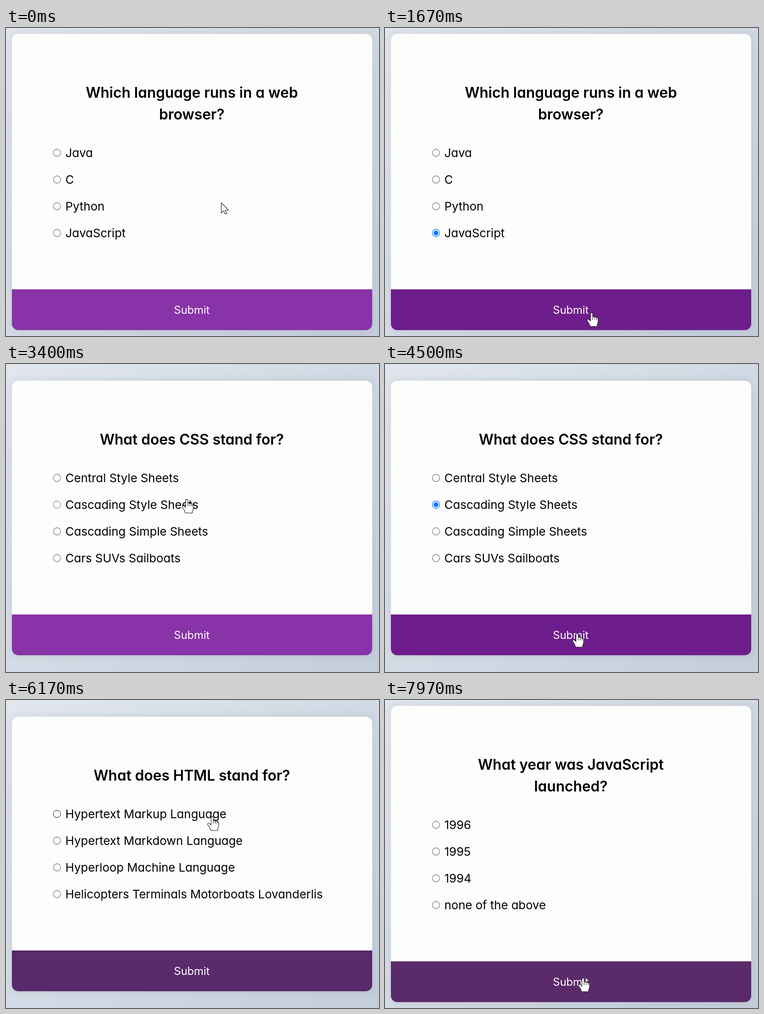
An HTML page that plays this animation: 823 px wide and 680 px high, repeating every 8000 ms.

```html
<!DOCTYPE html>
<html lang="en">
<head>
<meta charset="utf-8">
<title>Quiz</title>
<style>
  html, body { margin: 0; width: 100%; height: 100%; overflow: hidden; }
  body { background: linear-gradient(135deg, #e2e7ee, #c3cddc); }
  #card {
    position: absolute; left: 12.5px; width: 795px; border-radius: 14px;
    background: #fdfdfc; box-shadow: 0 0 16px 3px rgba(100, 100, 100, .12); overflow: hidden;
  }
  #submit { position: absolute; bottom: 0; width: 100%; height: 90px; }
  svg { position: absolute; left: 0; top: 0; width: 823px; height: 680px; }
  text { font: 26px Inter, "Open Sans", sans-serif; font-feature-settings: "cv11"; }
  .title { font-size: 32px; font-weight: 600; text-anchor: middle; }
  .button { font-size: 24px; fill: #fff; text-anchor: middle; }
  circle { fill: #fff; stroke-width: 1.3; }
</style>
</head>
<body>
<div id="card"><div id="submit"></div></div>
<svg>
  <g id="quiz"></g>
  <g id="cursor" fill="#fff" stroke="#111" stroke-width="1.1" stroke-linejoin="round">
    <path id="arrow" d="M0 0V22.5L5 17.8L9 25L12 23.5L8.5 16.3H16Z"/>
    <path id="hand" d="M-2.5 18V2a2.4 2.4 0 0 1 4.8 0V9q2.2-2.2 4.6 .6q2.3-1.8 4.2 1q3.1-1.2 3.1 2v7q0 3.500-2 6V29q0 1-1 1H-2.500Q-3.500 30-4 28Q-5 24-8 20L-10 17Q-10.500 14-8 14Q-6 14-2.500 18ZM2.300 9v6M6.900 9.600v5.400M11.100 10.600v4.400"/>
  </g>
</svg>
<script>
const LOOP = 8000;
const $ = id => document.getElementById(id);

// press: focus leaves the button; pick: radio gets checked; submit: button pressed; end: next question
const quizzes = [
  { title: ["Which language runs in a web", "browser?"],
    options: ["Java", "C", "Python", "JavaScript"],
    answer: 3, press: 0, pick: 800, submit: 1800, end: 1900 },
  { title: ["What does CSS stand for?"],
    options: ["Central Style Sheets", "Cascading Style Sheets", "Cascading Simple Sheets", "Cars SUVs Sailboats"],
    answer: 1, press: 3370, pick: 3450, submit: 4650, end: 4750 },
  { title: ["What does HTML stand for?"],
    options: ["Hypertext Markup Language", "Hypertext Markdown Language", "Hyperloop Machine Language",
              "Helicopters Terminals Motorboats Lovanderlis"],
    answer: 0, press: 6270, pick: 6320, submit: 7780, end: 7870 },
  { title: ["What year was JavaScript", "launched?"],
    options: ["1996", "1995", "1994", "none of the above"],
    answer: -1, press: Infinity, pick: Infinity, submit: Infinity, end: LOOP }
];

// time, x, y of the cursor's tip
const path = [
  [0, 475, 386], [650, 245, 450], [900, 245, 450], [1600, 456, 629], [2250, 456, 629],
  [3250, 399, 299], [3600, 399, 299], [4400, 424, 595], [5050, 424, 595],
  [6050, 455, 258], [6450, 455, 258], [7000, 506, 453], [7600, 437, 614], [LOOP, 437, 614]
];

const ease = u => u * u * (3 - 2 * u);

function cursorAt(t) {
  const i = path.findIndex(p => p[0] > t);
  const [a, b] = [path[i - 1], path[i]];
  const u = ease((t - a[0]) / (b[0] - a[0]));
  return [a[1] + (b[1] - a[1]) * u, a[2] + (b[2] - a[2]) * u];
}

const label = (cls, x, y, s) => `<text class="${cls}" x="${x}" y="${y}">${s}</text>`;

let shown, rows;
function showQuiz(quiz) {
  if (quiz === shown) return;
  shown = quiz;
  const two = quiz.title.length === 2;
  quiz.top = two ? 12.5 : 36.5;
  quiz.bottom = two ? 667 : 643;
  const firstRow = two ? 275.5 : 251.5;
  $("card").style.top = quiz.top + "px";
  $("card").style.height = quiz.bottom - quiz.top + "px";
  $("quiz").innerHTML =
    quiz.title.map((s, i) => label("title", 410, quiz.top + 141 + 48 * i, s)).join("") +
    quiz.options.map((s, i) => {
      const y = firstRow + 59 * i;
      return `<g><circle cx="112.5" cy="${y}" r="8"/><circle class="dot" cx="112.5" cy="${y}" r="5.2"/>` +
        label("option", 131, y + 9, s) + "</g>";
    }).join("") +
    label("button", 410, quiz.bottom - 36, "Submit");
  rows = [...$("quiz").querySelectorAll("g")].map((g, i) => ({
    y: firstRow + 59 * i, ring: g.children[0], dot: g.children[1], text: g.children[2]
  }));
}

function draw(t) {
  const index = quizzes.findIndex(q => t < q.end);
  const quiz = quizzes[index];
  showQuiz(quiz);
  const [x, y] = cursorAt(t);
  const onButton = y > quiz.bottom - 90;
  const focused = t >= quiz.submit || (index > 0 && t < quiz.press);
  $("submit").style.background = focused ? "#5a2a6a" : onButton ? "#6e1e8c" : "#8833a8";

  let onLabel = false;
  rows.forEach((row, i) => {
    const over = Math.abs(y - row.y) < 27 && x > 100 && x < 131 + row.text.getComputedTextLength();
    const checked = i === quiz.answer && t >= quiz.pick;
    const pressed = i === quiz.answer && t >= quiz.press && t < quiz.pick && index > 0;
    const blue = over ? "#005cc8" : "#0075ff";
    onLabel ||= over;
    row.ring.style.stroke = checked ? blue : pressed ? "#8d8d8d" : over ? "#4f4f4f" : "#767676";
    row.dot.style.fill = checked ? blue : "none";
  });

  const pointing = onButton || onLabel;
  $("hand").style.display = pointing ? "" : "none";
  $("arrow").style.display = pointing ? "none" : "";
  $("cursor").setAttribute("transform", `translate(${x} ${y})`);
}

const start = performance.now();
function tick() {
  draw((performance.now() - start) % LOOP);
  requestAnimationFrame(tick);
}
tick();
</script>
</body>
</html>
```
